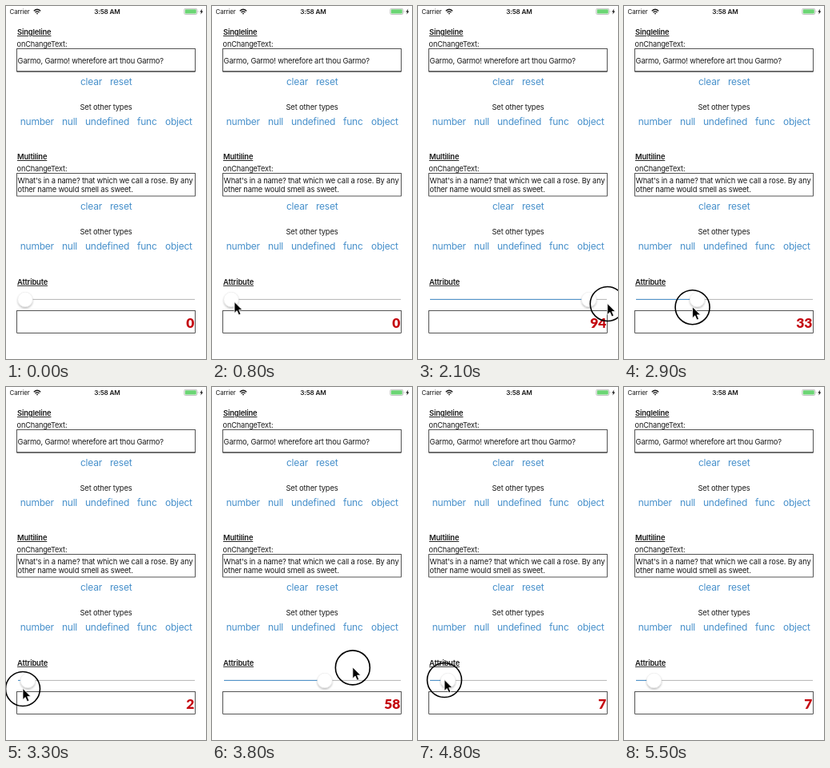
Write an HTML page that moves like this. It is 250 by 442 pixels and loops after 5900 ms.

```html
<!DOCTYPE html>
<html lang="en">
<head>
<meta charset="utf-8">
<title>Text field demo</title>
<style>
  html, body { margin: 0; width: 100%; height: 100%; overflow: hidden; background: #fff; }
  svg { display: block; width: 250px; height: 442px; }
  text { font: 9.4px Inter, Roboto, sans-serif; letter-spacing: -.02em; fill: #1a1a1a; }
  .head { font-weight: 600; text-decoration: underline; }
  .label { font-size: 9.2px; }
  .button { font-size: 12px; fill: #4790cb; }
  .status { font-size: 8px; }
  .time { font-size: 8.2px; font-weight: 600; text-anchor: middle; }
  .mid { text-anchor: middle; }
  .value { font: 900 17.5px Lato, "Open Sans", sans-serif; letter-spacing: 0; fill: #c40810; text-anchor: end; }
  .box { fill: #fff; stroke: #000; stroke-width: .67; }
</style>
</head>
<body>
<svg viewBox="0 0 250 442">
  <defs>
    <filter id="shadow" x="-50%" y="-50%" width="200%" height="200%">
      <feDropShadow dx="0" dy="1.6" stdDeviation="1.3" flood-opacity=".28"/>
    </filter>
  </defs>
  <text class="status" x="4.5" y="10">Carrier</text>
  <path d="M34.8 6.2Q39 2.2 43.2 6.2M36.5 8Q39 5.7 41.5 8" fill="none" stroke="#111" stroke-width="1.3"/>
  <path d="M39 8.4l1.1 1L39 10.6l-1.1-1.2z" fill="#111"/>
  <text class="time" x="126.5" y="10">3:58 AM</text>
  <rect x="222.8" y="3.3" width="16" height="7.2" rx="1.6" fill="none" stroke="#999" stroke-width=".6"/>
  <rect x="223.8" y="4.3" width="14" height="5.2" rx=".8" fill="#6bd574"/>
  <path d="M239.8 5.5q1.2 1.4 0 2.8z" fill="#888"/>
  <path d="M245.3 3.4l-3 4h1.8l-.8 3.2 3-4.1h-1.8z" fill="#111"/>
  <g id="form"></g>
  <text class="head" x="14" y="348.8">Attribute</text>
  <path d="M15 367.4H236" stroke="#b4b4b4"/>
  <path id="fill" stroke="#4790cb"/>
  <rect class="box" x="13.67" y="381.5" width="222.67" height="28"/>
  <text id="value" class="value" x="235.5" y="402.6"></text>
  <circle id="knob" cy="367.5" r="9.3" fill="#fff" stroke="#ddd" stroke-width=".4" filter="url(#shadow)"/>
  <g id="pointer">
    <circle id="ring" r="21.5" fill="none" stroke="#000" stroke-width="1.6"/>
    <path d="M0-.5V13.5L3.2 10.5 5.5 15.8 7.9 14.8 5.7 9.6H10z" stroke="#fff" stroke-width=".8"/>
  </g>
</svg>
<script>
const $ = id => document.getElementById(id);
const text = (cls, x, y, s) => `<text class="${cls}" x="${x}" y="${y}">${s}</text>`;

function section(top, title, lines) {
  const first = top + 71.7 - (lines.length - 1) * 5.6;
  return text("head", 14, top + 36, title) +
    text("label", 13.6, top + 51, "onChangeText:") +
    `<rect class="box" x="13.67" y="${top + 53.5}" width="222.67" height="28.5"/>` +
    lines.map((s, i) => text("", 14.6, first + i * 11.2, s)).join("") +
    text("button", 93, top + 99.3, "clear") +
    text("button", 130, top + 99.3, "reset") +
    text("mid", 125, top + 130, "Set other types") +
    [[17.7, "number"], [70, "null"], [99, "undefined"], [164, "func"], [199, "object"]]
      .map(([x, s]) => text("button", x, top + 149.3, s)).join("");
}

$("form").innerHTML =
  section(0, "Singleline", ["Garmo, Garmo! wherefore art thou Garmo?"]) +
  '<path d="M13.5 82H236.5" stroke="#333"/>' +
  section(156, "Multiline", ["What's in a name? that which we call a rose. By any",
    "other name would smell as sweet."]);

const LOOP = 5900, STEP = 100, PRESS = 1300, RELEASE = 5200;

// Places where the pointer rests or turns back
const stops = [
  { from: 0, to: 100, x: 62, y: 398 },
  { from: 600, to: 1200, x: 28, y: 371 },
  { from: 2200, to: 2200, x: 242, y: 373 },
  { from: 3300, to: 3550, x: 21, y: 378 },
  { from: 3950, to: 4100, x: 245, y: 346 },
  { from: 4650, to: RELEASE, x: 33, y: 367 },
  { from: 5500, to: LOOP, x: 50, y: 446 }
];

function pointerAt(t) {
  const b = stops.find(s => t <= s.to);
  if (t >= b.from) return b;
  const a = stops[stops.indexOf(b) - 1];
  const p = (t - a.to) / (b.from - a.to);
  return {
    x: a.x + (b.x - a.x) * (1 - Math.cos(p * Math.PI)) / 2,
    y: a.y + (b.y - a.y) * Math.sin(p * Math.PI / 2)
  };
}

// The knob trails the pointer a little and stays on its track
function knobAt(t) {
  if (t < PRESS) return 24;
  const { x } = pointerAt(Math.min(t, RELEASE) - 30);
  return Math.max(24, Math.min(226, 34 + (x - 29) * .88));
}

const show = (id, on) => $(id).setAttribute("visibility", on ? "visible" : "hidden");

function draw(now) {
  const t = Math.floor(now % LOOP / STEP) * STEP;
  const { x, y } = pointerAt(t), knob = knobAt(t);
  $("knob").setAttribute("cx", knob);
  $("fill").setAttribute("d", `M15 367.4H${knob}`);
  $("value").textContent = Math.round((knob - 24) / 2.02);
  $("pointer").setAttribute("transform", `translate(${x} ${y})`);
  show("pointer", t >= 100 && t < 5500);
  show("ring", t >= PRESS && t < RELEASE);
}

let start;
function tick(now) {
  start ??= now;
  draw(now - start);
  requestAnimationFrame(tick);
}
draw(0);
requestAnimationFrame(tick);
</script>
</body>
</html>
```
